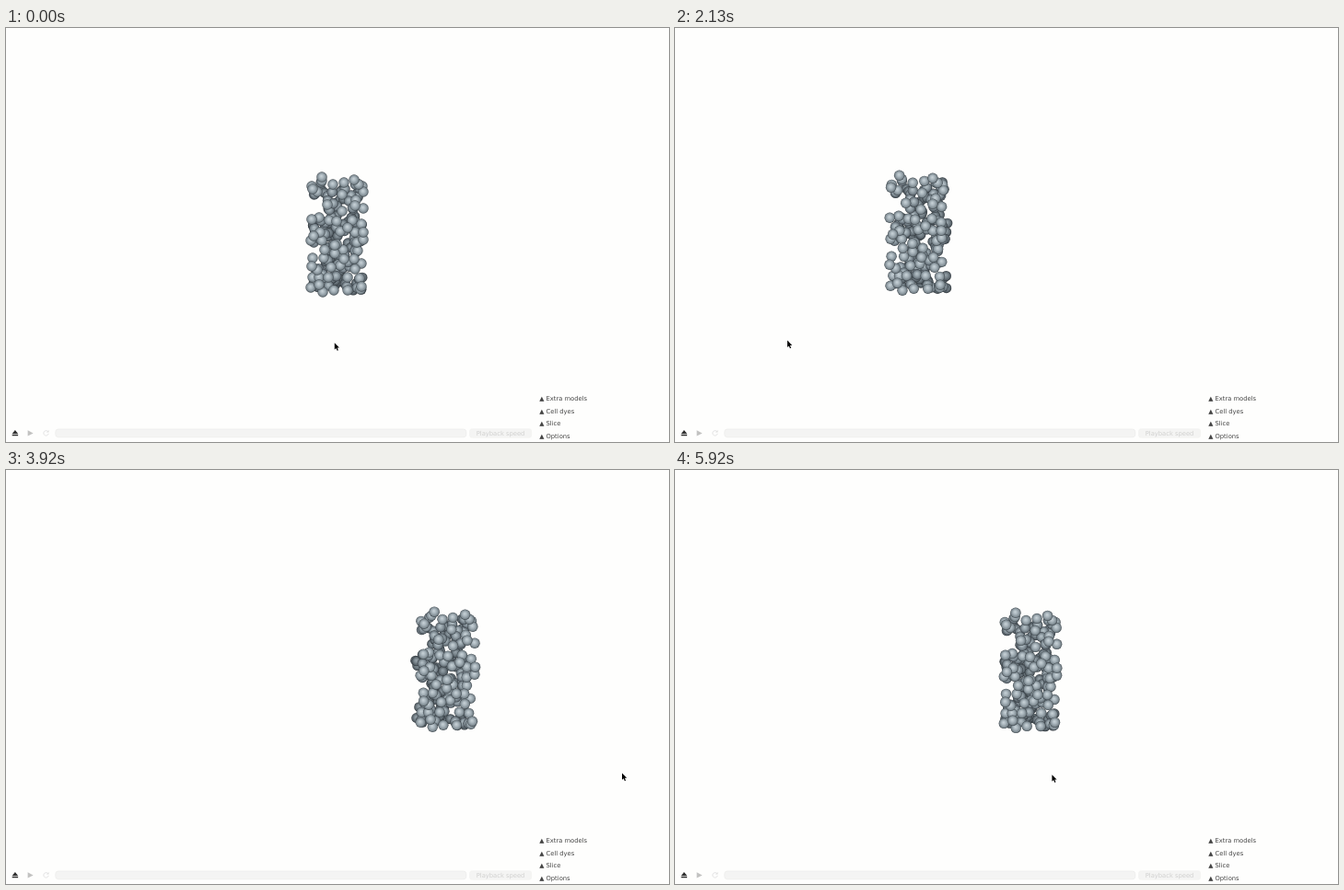
Recreate the animation shown at these times as an HTML page. Size 720x450 px, loop 6000 ms.

```html
<!DOCTYPE html>
<html lang="en">
<head>
<meta charset="utf-8">
<title>Particle column viewer</title>
<style>
  html, body { margin: 0; width: 100%; height: 100%; overflow: hidden; background: #fefefd; }
  svg { display: block; width: 100vw; height: 100vh; }
  text { font: 6.75px "DejaVu Sans", sans-serif; fill: #444; white-space: pre; }
</style>
</head>
<body>
<svg viewBox="0 0 720 450">
  <defs id="defs"></defs>
  <rect width="720" height="450" fill="#fefefd"/>
  <g id="balls"></g>

  <path d="M9.9 437L13.3 441.2H6.5ZM6.7 442H13.1V443.3H6.7Z" fill="#303030"/>
  <path d="M23.6 437.2L29.6 440.4L23.6 443.6Z" fill="#c2c2c1"/>
  <path d="M45.4 438.4A2.7 2.7 0 1 0 46.2 440.8" fill="none" stroke="#dededd" stroke-width=".8"/>
  <path d="M46.5 437V439.6H43.9Z" fill="#dededd"/>
  <rect x="53.8" y="436" width="446" height="8.8" rx="3" fill="#f4f4f3" stroke="#ebebea" stroke-width=".7"/>
  <rect x="503.6" y="435.7" width="67" height="9.6" rx="2.5" fill="#f4f4f3" stroke="#f0f0ef" stroke-width=".6"/>
  <text x="510.7" y="443" style="fill:#d0d0cf">Playback speed</text>
  <g id="menu"></g>

  <path id="cursor" d="M0 0V7.3L1.7 5.8L2.9 8.6L4.1 8.1L2.9 5.4H5.2Z" fill="#000"/>
</svg>
<script>
const LOOP = 6000, STEPS = 90, R = 5.75;
const byId = id => document.getElementById(id);

function add(parent, tag, attrs, text) {
  const el = document.createElementNS('http://www.w3.org/2000/svg', tag);
  for (const name in attrs) el.setAttribute(name, attrs[name]);
  if (text) el.textContent = text;
  parent.appendChild(el);
  return el;
}

['Extra models', 'Cell dyes', 'Slice', 'Options'].forEach((label, i) =>
  add(byId('menu'), 'text', { x: 579.2, y: 405.4 + 13.45 * i }, '▲ ' + label));

// Sphere shading, darker with depth
const shades = [
  ['#cad4d9', '#a9b5bc', '#7f8b92', '#3c454b'],
  ['#b9c4ca', '#97a4ab', '#6d7880', '#343c42'],
  ['#98a3aa', '#7b878e', '#576168', '#2c3338']
];
shades.forEach((colors, i) => {
  const grad = add(byId('defs'), 'radialGradient', { id: 'shade' + i, cx: .5, cy: .5, r: .5, fx: .45, fy: .4 });
  colors.forEach((color, j) =>
    add(grad, 'stop', { offset: [0, .42, .8, 1][j], 'stop-color': color }));
});

let seed = 41;
function random() {
  seed = (seed * 16807) % 2147483647;
  return seed / 2147483647;
}

// Front spheres as x, y offsets from (330, 160)
const front = [
  13,2, 48,5, 37,8, 25,10, 2,12, 8,18, 57,12, 58,18, 35,21, 19,32, 50,27, 58,36,
  49,33, 35,39, 2,48, 10,46, 21,49, 29,50, 46,49, 56,53, 41,57, 33,61, 49,62,
  58,62, 11,62, 4,66, 1,71, 13,71, 27,76, 51,73, 58,70, 16,81, 36,81, 52,82,
  27,85, 3,90, 15,90, 37,91, 48,91, 56,96, 2,99, 8,103, 23,100, 31,97, 49,102,
  3,111, 10,111, 20,111, 41,111, 54,112, 56,121, 55,124, 1,122, 10,119, 14,127,
  26,125, 41,125, 13,6, 3,15, 53,10, 29,75, 33,98
];

// Notches in the outline that stay empty
function inGap(x, y) {
  return x < 14 && y > 23 && y < 46 || x < 12 && y > 74 && y < 88 ||
    x > 51 && y > 38 && y < 51 || x > 52 && y > 75 && y < 94 ||
    x > 49 && y > 102 && y < 111 || y < 14 && x > 13 && x < 46;
}

const balls = [];
for (let i = 0; i < front.length; i += 2)
  balls.push({ x: 330 + front[i], y: 160 + front[i + 1], z: .35 * random() });
for (let i = 0; i < 170; i++) {
  const x = 3 + 54 * random(), y = 8 + 117 * i / 169, z = .36 + .64 * random();
  if (!inGap(x, y)) balls.push({ x: 330 + x, y: 160 + y, z });
}
balls.sort((a, b) => b.z - a.z);
for (const ball of balls) {
  const level = ball.z < .36 ? 0 : ball.z < .65 ? 1 : 2;
  ball.el = add(byId('balls'), 'circle', { r: R - .3 * ball.z, fill: `url(#shade${level})` });
}

// Monotone cubic through [step, value] points
function curve(points) {
  const slope = i => (points[i + 1][1] - points[i][1]) / (points[i + 1][0] - points[i][0]);
  const last = points.length - 1;
  const tangents = points.map((p, i) => {
    if (i === 0) return 0;
    if (i === last) return slope(last - 1);
    const a = slope(i - 1), b = slope(i);
    return a * b <= 0 ? 0 : 2 * a * b / (a + b);
  });
  return k => {
    let i = 0;
    while (i < last - 1 && k > points[i + 1][0]) i++;
    const [k0, v0] = points[i], [k1, v1] = points[i + 1];
    const h = k1 - k0, u = (k - k0) / h, w = 1 - u;
    return v0 * w * w * (1 + 2 * u) + v1 * u * u * (3 - 2 * u) +
      h * u * w * (tangents[i] * w - tangents[i + 1] * u);
  };
}

const cursorX = curve([[0, 356.8], [4, 356.8], [6, 330], [14, 154], [16, 109.8], [18, 87], [20, 79],
  [24, 77], [28, 78], [30, 89], [32, 122], [34, 194], [40, 399.6], [44, 520], [48, 615],
  [51, 654], [54, 669], [67, 669], [69, 659], [77, 565], [80, 526], [87, 435], [89, 409.4]]);
const cursorY = curve([[0, 342.2], [4, 342.2], [16, 338.8], [24, 339], [32, 339.6], [34, 338.5],
  [40, 330], [44, 329], [49, 326], [54, 329.4], [67, 329.4], [77, 331], [89, 331.2]]);
// The column trails the pointer
const panX = curve([[0, 0], [4, 0], [6, -5], [14, -70], [16, -85], [18, -96], [20, -102], [24, -106],
  [28, -106], [30, -103], [32, -96], [34, -81], [40, .7], [44, 53], [48, 86], [51, 101],
  [54, 110], [56, 116], [59, 118], [67, 118], [69, 116], [77, 86], [80, 72.5], [87, 37], [89, 26]]);
const panY = curve([[0, 0], [4, 0], [16, -2], [24, -2], [32, -1.7], [34, -2], [40, -6.6],
  [44, -8], [49, -9.8], [54, -8.2], [59, -7.6], [67, -7.6], [80, -6.4], [89, -6.5]]);

// Fifteen poses a second, shown on a 24 Hz grid rounded to 10 ms
const startOf = k => Math.round(Math.round(k * 1.6) * 100 / 24) * 10;

function stepAt(time) {
  let k = Math.min(STEPS - 1, Math.floor(time * .015) + 1);
  while (k > 0 && startOf(k) > time) k--;
  return k;
}

function draw(time) {
  const k = stepAt(time), dx = panX(k), dy = panY(k);
  for (const { el, x, y, z } of balls) {
    const depth = 1.035 - .095 * z;
    el.setAttribute('cx', (x + dx * depth).toFixed(2));
    el.setAttribute('cy', (y + dy * depth).toFixed(2));
  }
  byId('cursor').setAttribute('transform', `translate(${cursorX(k).toFixed(2)} ${cursorY(k).toFixed(2)})`);
}

const began = performance.now();
function tick() {
  draw((performance.now() - began) % LOOP);
  requestAnimationFrame(tick);
}
tick();
</script>
</body>
</html>
```
